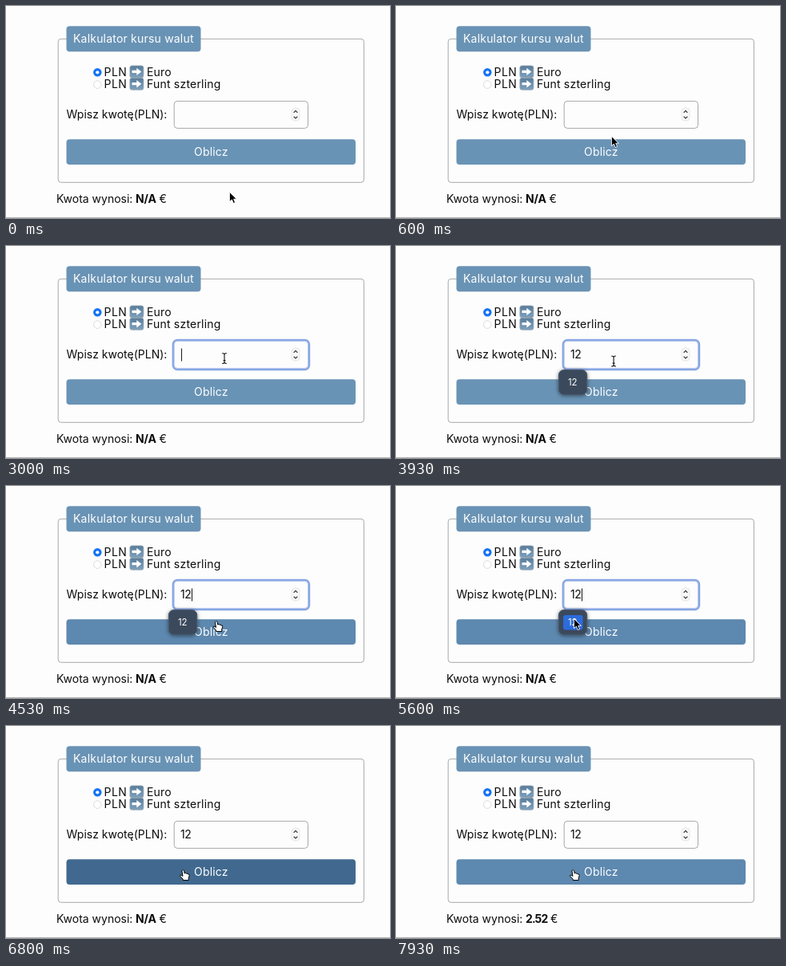
These frames come from a looping animation (480 by 266 pixels, 8000 ms). An HTML page:

```html
<!DOCTYPE html>
<html lang="pl">
<head>
<meta charset="utf-8">
<title>Kalkulator</title>
<style>
  html, body { margin: 0; width: 100%; height: 100%; overflow: hidden; background: #fdfdfd; }
  svg { display: block; width: 480px; height: 266px; }
  text { font: 14px Inter, "Open Sans", sans-serif; fill: #0c0c0c; }
  .light { fill: #fff; }
  .wide { letter-spacing: .2px; }
  .bold { font-weight: 700; }
  .digits { letter-spacing: -.5px; }
</style>
</head>
<body>
<svg viewBox="0 0 480 266">
  <defs>
    <filter id="shadow" x="-50%" y="-50%" width="200%" height="200%">
      <feDropShadow dx="0" dy="1" stdDeviation="2.6" flood-opacity=".5"/>
    </filter>
    <linearGradient id="tile" x2="0" y2="1">
      <stop stop-color="#587c9a"/>
      <stop offset="1" stop-color="#7da0bd"/>
    </linearGradient>
    <g id="emoji">
      <rect x=".4" y=".4" width="17" height="15" rx="2.5" fill="url(#tile)" stroke="#98a5b0" stroke-width=".8"/>
      <path d="M3 6.3H8.8V3.2L14.8 7.9 8.8 12.6V9.5H3Z" fill="#fff"/>
    </g>
  </defs>

  <rect width="480" height="266" fill="#fdfdfd"/>
  <path d="M0 265.5H480" stroke="#b5b5b5"/>
  <rect x="65.2" y="41.3" width="382.2" height="180" rx="3.5" fill="none" stroke="#a8a8a8"/>
  <rect x="75.5" y="25.2" width="168" height="32" rx="4" fill="#6993b5"/>
  <text class="light wide" x="84" y="46">Kalkulator kursu walut</text>

  <circle cx="114.3" cy="83.3" r="5.2" fill="#1473f5"/>
  <circle cx="114.3" cy="83.3" r="2.1" fill="#fff"/>
  <circle cx="114.3" cy="98.6" r="4.8" fill="#fff" stroke="#d2d2d2" stroke-width=".8"/>
  <text x="122.5" y="87.7" letter-spacing=".5">PLN</text>
  <text x="122.5" y="102.7" letter-spacing=".5">PLN</text>
  <use href="#emoji" x="154.5" y="74.5"/>
  <use href="#emoji" x="154.5" y="89.8"/>
  <text x="176" y="87.7" class="wide">Euro</text>
  <text x="176" y="102.7" class="wide">Funt szterling</text>

  <text x="75.5" y="140.5">Wpisz kwotę(PLN):</text>
  <rect id="ring" fill="none" stroke="#87a5e3" stroke-width="3.4"/>
  <rect id="field" x="210.2" y="119.4" width="167.3" height="34" rx="4" fill="#fdfdfd"/>
  <rect x="357" y="128" width="10" height="16" rx="4" fill="#f8f8f8" stroke="#e0e0e0" stroke-width=".8"/>
  <path d="M359.6 133.8L362 131.4 364.4 133.8M359.6 138.6L362 141 364.4 138.6" fill="none" stroke="#333" stroke-width="1.2"/>
  <text id="amount" class="digits" x="218" y="141"></text>
  <path id="caret" d="M0 128.5V144.5" stroke="#222" stroke-width="1.1"/>

  <rect id="button" x="75.5" y="167.2" width="361.5" height="31.8" rx="4"/>
  <text class="light wide" x="235" y="187.5">Oblicz</text>

  <text x="63" y="247">Kwota wynosi:</text>
  <text id="result" class="bold" x="162" y="247"></text>
  <text id="euro" y="247">€</text>

  <g id="popup">
    <rect x="203.3" y="155.5" width="35.5" height="31" rx="6.5" fill="#3b4a5b" stroke="#4a5a6d" filter="url(#shadow)"/>
    <rect id="choice" x="209" y="162" width="24.5" height="18.5" rx="3" fill="#2c6cdc"/>
    <text class="light" x="215" y="175.2" style="font-size:11.5px;letter-spacing:-.2px">12</text>
  </g>

  <g id="pointer" stroke-linejoin="round">
    <path id="arrow" d="M-.6-.6V11.6L2.4 9.1 4.3 13.6 6.5 12.6 4.7 8.3H8.3Z" fill="#000" stroke="#fff" stroke-width=".9"/>
    <path id="beam" d="M-2.8-6.5Q0-6.5 0-4.8 0-6.5 2.8-6.5M0-5V5.2M-2.8 6.5Q0 6.5 0 4.8 0 6.5 2.8 6.5M-1.4 2.6H1.4" fill="none" stroke="#111" stroke-width="1.1"/>
    <path id="hand" d="M-2.1 1Q-.9-.8 .6 1L1.2 4.5Q2.6 2.6 3.6 4.9 5.2 3.7 5.7 5.6 7.4 4.9 7.2 7.2L6.2 10.5V13H-.8V11.7L-4.6 7.6Q-4.4 5.8-2.5 6.9L-1 8Z" fill="#fff" stroke="#000"/>
  </g>
</svg>
<script>
const LOOP = 8000;
const FOCUS = 1530, TYPE_ONE = 3200, TYPE_TWO = 3400, POPUP = 3870, PICK = 5870, PRESS = 6800, RELEASE = 6870;

// Pointer stops: time, x, y
const path = [
  [0, 280, 234], [70, 279, 231], [330, 275, 192], [600, 270, 164], [870, 269, 149],
  [930, 270, 148], [1270, 273, 141], [3870, 273, 141], [4270, 267, 164],
  [4530, 263.5, 169.5], [4600, 263, 170], [4930, 233, 180], [5400, 233, 180],
  [5600, 223, 167], [5900, 223, 167], [6530, 222, 180.5], [LOOP, 222, 180.5]
];

const el = id => document.getElementById(id);
const clamp = v => Math.max(0, Math.min(1, v));
const ramp = (t, start, length) => clamp((t - start) / length);
const show = (id, on) => el(id).setAttribute("opacity", Number(on));
const set = (id, attrs) => {
  for (const key in attrs) el(id).setAttribute(key, attrs[key]);
};

function pointerAt(t) {
  const i = path.findIndex(stop => stop[0] > t);
  const [t0, x0, y0] = path[i - 1], [t1, x1, y1] = path[i];
  const k = (t - t0) / (t1 - t0);
  return [x0 + (x1 - x0) * k, y0 + (y1 - y0) * k];
}

function drawField(t) {
  const focused = t >= FOCUS && t < PRESS;
  const grow = 4 * (1 - ramp(t, FOCUS, 270));
  set("ring", {
    x: 209.3 - grow / 2, y: 118.5 - grow / 2,
    width: 169.2 + grow, height: 36 + grow, rx: 5
  });
  show("ring", focused && ramp(t, FOCUS - 70, 200));
  set("field", { stroke: focused ? "#b9c9ee" : "#a8a8a8" });

  const typed = t < TYPE_ONE ? 0 : t < TYPE_TWO ? 1 : 2;
  el("amount").textContent = "12".slice(0, typed);
  const blinkStart = typed === 2 ? TYPE_TWO : typed ? TYPE_ONE : FOCUS;
  const caretOn = Math.floor((t - blinkStart) / 500) % 2 === 0;
  show("caret", focused && caretOn);
  set("caret", { transform: `translate(${[219.5, 224, 232.5][typed]} 0)` });
}

function drawPointer(t) {
  const [x, y] = pointerAt(t);
  const overPopup = t >= POPUP && t < PICK + 200 && x < 232 && y < 187;
  const overButton = !overPopup && y >= 167 && y <= 199;
  const overField = !overPopup && y < 155;
  set("pointer", { transform: `translate(${x} ${y})` });
  show("pointer", t < 3130 || t >= 3800);
  show("hand", overButton);
  show("beam", overField);
  show("arrow", !overButton && !overField);
  show("choice", overPopup);

  const hover = overButton || t > 4500;
  const pressed = t >= PRESS && t < RELEASE;
  set("button", { fill: pressed ? "#41698f" : hover ? "#5d88af" : "#6993b5" });
}

function draw(t) {
  drawField(t);
  drawPointer(t);
  show("popup", ramp(t, POPUP - 70, 70) * (1 - ramp(t, PICK, 260)));
  const done = t >= RELEASE;
  el("result").textContent = done ? "2.52" : "N/A";
  set("result", { "letter-spacing": done ? -.9 : -.1 });
  set("euro", { x: done ? 193 : 191.5 });
}

const start = performance.now();
function tick() {
  draw((performance.now() - start) % LOOP);
  requestAnimationFrame(tick);
}
tick();
</script>
</body>
</html>
```
